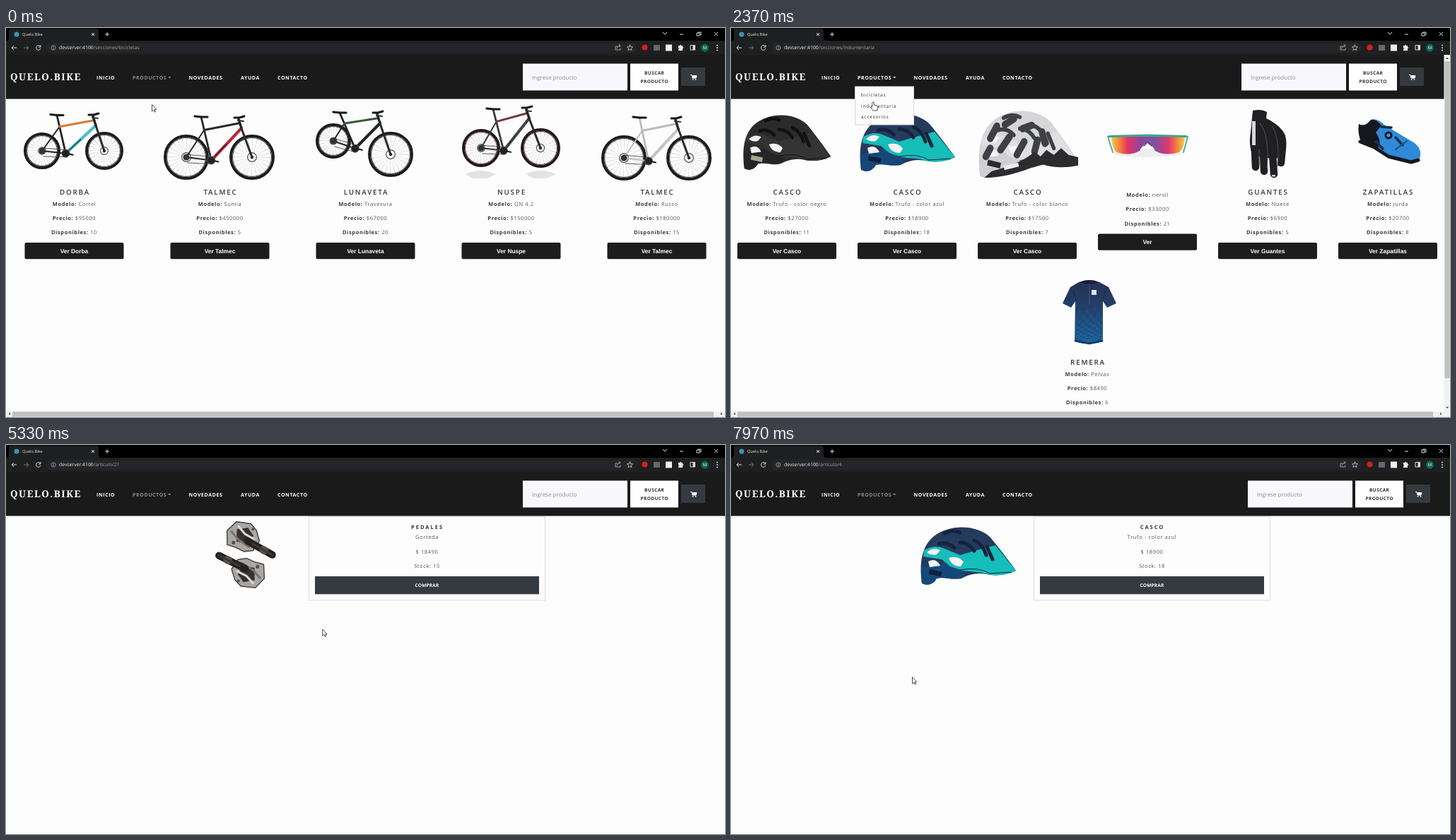
An HTML page for the animation above (8 s loop, 1017 px wide and 551 px high).

```html
<!DOCTYPE html>
<html lang="es">
<head>
<meta charset="utf-8">
<title>Tienda</title>
<style>
html, body { margin: 0; width: 100%; height: 100%; overflow: hidden; background: #fdfdfd }
svg { display: block }
text { font-family: "Open Sans", "Noto Sans", sans-serif; white-space: pre; text-rendering: geometricPrecision }
.mid { text-anchor: middle }
.b { font-weight: 700 }
.info { font-size: 7.5px; letter-spacing: .6px; fill: #555 }
.info tspan { font-weight: 700; fill: #3a3a3a }
.btn { font: 700 8.4px "Liberation Sans", Arial, sans-serif; fill: #fff }
.nav { font-size: 7px; font-weight: 700; letter-spacing: .6px }
.logo { font: 900 13.5px "Noto Serif", serif; letter-spacing: 1.5px }
</style>
</head>
<body>
<svg id="stage" width="1017" height="551" viewBox="0 0 1017 551"></svg>
<script>
const text = (x, y, s, attrs) => `<text x="${x}" y="${y}" ${attrs}>${s}</text>`;
const rect = (x, y, w, h, fill, attrs = '') => `<rect x="${x}" y="${y}" width="${w}" height="${h}" fill="${fill}" ${attrs}/>`;
const disc = (x, y, r, fill, attrs = '') => `<circle cx="${x}" cy="${y}" r="${r}" fill="${fill}" ${attrs}/>`;
const path = (d, fill, attrs = '') => `<path d="${d}" fill="${fill}" ${attrs}/>`;
const stroke = (d, color, w = 1) => path(d, 'none', `stroke="${color}" stroke-width="${w}" stroke-linecap="round" stroke-linejoin="round"`);
const line = (pts, color, w) => stroke('M' + pts.join('L'), color, w);
const group = (s, attrs) => `<g ${attrs}>${s}</g>`;
const mix = (a, b, k) => a.map((v, i) => v + (b[i] - v) * k);
const off = (p, x, y) => [p[0] + x, p[1] + y];

// Browser window and navigation bar
function chrome() {
  const bar = '#1e1f21';
  const thin = d => path(d, 'none', 'stroke="#ddd"');
  return rect(0, 0, 1017, 18, '#000') + rect(0, 18, 1017, 20, bar) +
    path('M1 18Q4 18 4 14V4Q4 1 7 1H128Q131 1 131 4V14Q131 18 135 18Z', bar) +
    disc(15, 9, 3.5, '#3f96ad') + text(23, 11, 'Quelo.Bike', 'font-size="5.7" fill="#e4e4d8"') +
    thin('M121 7l4 4m0-4l-4 4M140 9h6m-3-3v6') +
    thin('M929 6l3 3 3-3M953 9h5M977 7h4v4h-4zM979 7v-1h4v4h-1M1002 6l5 5m0-5l-5 5') +
    rect(57, 20.5, 835, 15, '#242528', 'rx="7.5"') +
    thin('M15 28H8l3-3m-3 3l3 3') + path('M25 28h7l-3-3m3 3l-3 3', 'none', 'stroke="#777"') +
    thin('M48.5 26A3.3 3.3 0 1 0 49 29M49 24v3h-3') +
    disc(67, 28, 3.1, 'none', 'stroke="#aaa" stroke-width=".8"') + rect(66.6, 27.4, .9, 2.5, '#bbb') + rect(66.6, 25.8, .9, .9, '#bbb') +
    '<text id="url" x="75" y="30.4" font-size="6.85" fill="#a0a3a7"><tspan fill="#eee">devserver:4100</tspan><tspan id="route"></tspan></text>' +
    stroke('M865 26h-3v5h7v-2M864 29q1-4 5-4m-2-2l2 2-2 2', '#bbb', .8) +
    stroke('M882.5 24l1.2 2.6 2.8.3-2.1 1.9.6 2.8-2.5-1.5-2.5 1.5.6-2.8-2.1-1.9 2.8-.3z', '#ddd', .8) +
    disc(903.5, 27.5, 4, '#d32020') + rect(916, 24, 9, 8, '#65686e') + rect(933, 23.5, 9, 9, '#f0f0f0') +
    path('M951 25h2q1-3 2 0h2v2q3 1 0 2v3h-6v-2q2-1 0-2z', '#eee') +
    thin('M968 24.5h6.5v6.5h-6.5z') + rect(971.5, 24, 3, 7, '#ddd') +
    disc(988.5, 28, 5.5, '#0b6a55') + text(988.5, 30.2, 'M', 'class="mid" font-size="6" fill="#fff"') +
    [24.5, 28, 31.5].map(y => disc(1006, y, 1, '#ddd')).join('');
}
function navbar() {
  const links = [[128, 'INICIO'], [258.5, 'NOVEDADES'], [332, 'AYUDA'], [384, 'CONTACTO']];
  return rect(0, 38, 1017, 62.5, '#1a1a1a') + text(6, 73.5, 'QUELO.BIKE', 'class="logo" fill="#fff"') +
    links.map(([x, s]) => text(x, 72.5, s, 'class="nav" fill="#fff"')).join('') +
    group(text(179, 72.5, 'PRODUCTOS', 'class="nav"') + '<path d="M229 69h4.5l-2.25 2.3z"/>', 'id="products"') +
    group(rect(731, 50.5, 148, 38, '#f7f7fc') + text(744, 72.7, 'Ingrese producto', 'font-size="8" fill="#8b8d93"') +
      rect(883, 50.5, 68, 38, '#fff') +
      ['BUSCAR', 'PRODUCTO'].map((s, i) => text(917.2, 65.5 + i * 12.7, s, 'class="mid b" font-size="6.5" letter-spacing=".4" fill="#2b2f33"')).join('') +
      rect(955, 56, 34, 26, '#343a40') + path('M968 66.5h2l1 4.5h5l1-3.5h-6', '#fff', 'stroke="#fff"') +
      disc(971.5, 72.8, .9, '#fff') + disc(975.5, 72.8, .9, '#fff'), 'id="search"');
}
function menu() {
  return group(rect(175, 82.5, 84, 55, '#fcfcfd') + rect(175.5, 83, 83, 54, 'none', 'stroke="#000" stroke-opacity=".15"') +
    ['bicicletas', 'indumentaria', 'accesorios'].map((s, i) => text(184, 97.4 + i * 15.4, s, 'font-size="6.5" letter-spacing=".75" fill="#333"')).join(''), 'id="menu"');
}
function scrollbars(right, vertical) {
  let s = rect(0, 543, 1017, 8, '#f1f1f1') + rect(9, 543.5, right - 25, 7, '#c1c1c1') +
    path(`M6 544.5v4l-2.5-2zM${right - 6} 544.5v4l2.5-2z`, '#505050');
  if (vertical) s += rect(1008.5, 38, 8.5, 505, '#f1f1f1') + rect(1009.5, 47, 7, 449, '#c1c1c1') +
    path('M1011 44h4l-2-2.5zM1011 536.5h4l-2 2.5z', '#505050');
  return s;
}

// Product cards
function card(x, name, model, price, stock, dy = 0) {
  const info = [['Modelo', model], ['Precio', '$' + price], ['Disponibles', stock]];
  const y = dy - (name ? 0 : 12.6);
  const label = 'Ver ' + name.slice(0, 1) + name.slice(1).toLowerCase();
  return text(x + 1, 236 + y, name, 'class="mid" font-size="9.8" font-weight="600" letter-spacing="1.8" fill="#33373b"') +
    info.map(([k, v], i) => text(x, 251.6 + y + i * 20.3, `<tspan>${k}:</tspan> ${v}`, 'class="mid info"')).join('') +
    rect(x - 70, 304 + y, 140, 23.3, '#1d1d1d', 'rx="2"') + text(x, 318.6 + y, label.trim(), 'class="mid btn"');
}
function detail(name, model, price, stock) {
  return rect(428.5, 101.5, 334, 118.5, '#fdfdfd', 'stroke="#dcdcd8"') +
    text(596, 118.5, name, 'class="mid b" font-size="7.5" letter-spacing="2" fill="#333"') +
    [model, '$ ' + price, 'Stock: ' + stock].map((s, i) => text(595.5, 133.3 + i * 20.3, s, 'class="mid info"')).join('') +
    rect(437, 186, 317, 25.3, '#343a40') + text(595.5, 201.2, 'COMPRAR', 'class="mid b" font-size="6.5" letter-spacing=".2" fill="#fff"');
}

// Pictures
function wheel([x, y], r, rim) {
  return disc(x, y, r / 2, 'none', `stroke="#999" stroke-width="${r}" stroke-dasharray=".25 ${Math.PI * r / 24 - .25}"`) +
    disc(x, y, r - 2, 'none', 'stroke="#1c1c1c" stroke-width="4"') +
    disc(x, y, r - 4.6, 'none', `stroke="${rim}" stroke-width="1"`) +
    disc(x, y, r * .2, 'none', 'stroke="#555" stroke-width="1.2"') + disc(x, y, 2.2, '#222');
}
function bike(rear, front, r1, r2, seat, bar, color, down, top = color, rim = '#444') {
  const crank = off(mix(rear, front, .38), 0, r1 * .14);
  const joint = mix(seat, crank, .3), head = off(bar, -1, 8), fork = off(bar, 3, 15);
  return wheel(rear, r1, rim) + wheel(front, r2, rim) +
    line([joint, rear, crank], color, 2) + line([seat, crank], color, 2.8) +
    line([joint, head], top, 3) + line([crank, fork], down, 4.2) + line([mix(crank, fork, .1), mix(crank, fork, .5)], color, 1.2) +
    line([off(bar, -1, 2), fork], '#222', 3.4) + line([fork, front], '#2b2b2b', 3) +
    line([off(bar, -7, 0), bar, off(bar, 7, -2)], '#181818', 3) + line([off(bar, -2, 4), off(bar, 6, 5)], '#333', 2) +
    line([off(seat, -9, -1), seat, off(seat, 9, 0)], '#181818', 3.2) +
    line([off(rear, 0, -4), off(crank, 0, -5)], '#333', .8) + line([off(rear, 2, 8), off(crank, 0, 5)], '#333', .8) +
    disc(...rear, 4.5, '#333') + disc(...crank, 5.5, '#222', 'stroke="#555"') +
    line([off(crank, -3, -1), off(crank, 10, 2)], '#222', 2.2);
}
function helmet(x, y, sx, sy, dome, back, visor, slot, badge, extra = '') {
  return group(
    path('M2 80C-2 50 2 28 18 14C40-4 78-4 98 14C108 26 124 46 135 62Q120 70 98 68C84 64 70 66 58 73C44 76 32 70 23 73Q18 82 8 82Z', dome) +
    path('M1 58L40 50L60 60L62 70C44 76 32 70 23 73Q18 82 8 82L2 80Z', back) +
    path('M5 33Q20 25 32 30L56 40L76 34L98 28L106 26L135 62Q120 70 98 68C84 63 72 64 60 62L42 56L30 46L4 42Z', visor) +
    path('M9 36Q18 28 28 33L23 39Q15 41 9 36ZM40 44Q54 40 61 50L57 56Q44 56 40 44ZM11 49Q22 43 28 55L13 57Z', '#f4f4f4') +
    stroke('M34 9Q46 3 56 8M56 22Q68 22 76 34M76 19Q88 24 93 40M26 24Q38 20 48 30M94 28L102 46', slot, 5) +
    stroke('M56 61Q82 56 98 66L128 64', slot, 1) +
    extra + rect(12, 62, 18, 7, badge, 'transform="rotate(12 22 66)"'),
    `transform="translate(${x} ${y}) scale(${sx} ${sy})"`);
}
const blueHelmet = (x, y) => helmet(x, y, 1, 1, '#243b5e', '#154878', '#16bdb9', '#15243c', '#0d2240');
const blackHelmet = () => helmet(17, 123, .92, .95, '#2b2b2c', '#252526', '#343435', '#111', '#a9a591');
function whiteHelmet() {
  const vents = stroke('M16 34L25 19M30 48L42 32M52 54L62 38M76 50L80 36M36 17L48 10M60 22L72 18M10 56L16 46M90 40L86 26', '#3f4046', 9);
  const peak = path('M18 74Q60 64 76 50L84 56L92 48L102 54L112 46L122 54L135 57V67Q108 72 88 66C66 70 44 82 8 82Z', '#2c2c2f');
  return helmet(350, 117, 1.045, 1.16, '#d6d6d9', '#d0d0d4', '#dfdfe2', '#3f4046', '#2c2c2f', vents + peak + rect(34, 66, 20, 5, '#eee', 'transform="rotate(-12 42 66)"'));
}
function glasses() {
  return '<ellipse cx="589" cy="177" rx="50" ry="6" fill="#eee"/>' +
    line([[540, 176], [533, 154], [590, 153], [646, 154], [640, 176]], '#55ad98', 2) +
    path('M538 154H642Q642 168 634 176Q614 182 600 174Q595 164 589 163Q583 164 578 174Q564 182 545 176Q538 168 538 154Z', 'url(#lens)') +
    line([[535, 153.5], [589, 152], [644, 153.5]], '#3da58f', 3) + line([[584, 167], [589, 162], [595, 167]], '#455', 1.5);
}
function glove() {
  return path('M738 117Q750 114 758 119L757 128Q778 138 784 152Q787 164 784 176L770 186L737 180Q732 162 735 148Z', '#202022') +
    stroke('M741 172L742 197M753 176L754 203M766 178L768 207M780 168L778 191', '#202022', 10.5) +
    stroke('M748 135Q762 152 758 198M766 140Q777 160 773 196M747 172V194', '#48484b', 1.2) +
    rect(737, 132, 5, 34, '#d8d8d8') + rect(765, 208, 5, 2.5, '#ccc');
}
function shoe() {
  return path('M888 136Q897 141 905 130Q914 127 924 137Q945 150 962 160Q977 168 975 182Q972 191 960 191Q930 186 912 171L892 163Q886 150 888 136Z', '#2f8ad8') +
    path('M888 136Q897 141 905 130Q912 128 920 138L912 148Q922 162 914 171L892 163Q886 150 888 136Z', '#15181f') +
    line([[890, 161], [910, 169], [930, 182], [962, 190], [972, 187]], '#15181f', 5) +
    stroke('M920 140L934 141M940 155L950 166M912 161L922 171', '#15304c', 3.5) + line([[940, 172], [956, 160]], '#1b5b94', 2.5) +
    disc(930, 152, 5.5, '#15181f') + disc(930, 152, 2.5, '#4b9fe0');
}
function jersey() {
  let specks = '';
  for (let i = 0; i < 160; i++) {
    const y = 392 + 50 * Math.sqrt(i * .618 % 1);
    specks += rect((488 + i * 7.3 % 37).toFixed(1), y.toFixed(1), 1, 1, i % 2 ? '#1b3459' : '#2678b3');
  }
  return path('M492 360Q507 354 521 360L534 367L545 390L532 396L526 387L526 444Q507 451 486 444L487 387L481 396L469 390L480 367Z', 'url(#cloth)') + specks +
    path('M494 360Q507 354 519 360Q507 366 494 360Z', '#17213b') + stroke('M488 386L484 372M526 386L529 372', '#1b294a') +
    line([[507, 363], [507, 390]], '#5a6f96', .7) + rect(510, 371, 7, 7, '#dfe6ee') + line([[487, 443], [507, 447], [525, 443]], '#12395e', 2.5);
}
function pedals() {
  const body = (x, y, turn) => group(
    path('M-23-6L-12-20L8-20L17-12L23 2L16 16L4 19L-8 15L-20 13Z', '#aaa6a3', 'stroke="#4b4948" stroke-width="1.5"') +
    path('M-10-10L5-14L14-4L8 8L-8 7Z', '#35322f') +
    line([[-17, -6], [-6, 4], [10, 12]], '#777370', 3) + line([[-8, -14], [2, -5], [15, 0]], '#ddd9d5', 3) +
    disc(-12, 9, 2.5, '#55514e') + disc(12, -13, 2, '#55514e'), `transform="translate(${x} ${y}) rotate(${turn})"`);
  const axle = (a, b) => line([a, b], '#24221f', 10) + line([mix(a, b, .65), mix(a, b, .68)], '#55524e', 11) + line([mix(a, b, .2), b], '#3d3935', 3);
  return body(509, 136, 8) + axle([515, 141], [549, 160]) + body(516, 184, 186) + axle([512, 179], [476, 161]);
}

const pages = {
  bikes: bike([51, 174], [139, 174], 26, 27, [72, 123.5], [124, 123], '#222', '#49bfc6', '#d97b35') +
    bike([255, 183], [348, 183], 32, 32, [276, 126], [330, 127], '#26282b', '#bb2635') +
    bike([463, 160], [544, 179], 25, 32, [472, 120], [526, 120], '#202322', '#232625', '#38583a') +
    path('M650 207Q672 197 693 207L680 213H660ZM735 207Q757 197 778 207L765 213H746Z', '#e2e2e2') +
    bike([672, 170], [756, 170], 27, 28, [689, 115], [737, 113], '#37373b', '#424248', '#6d3a40', '#7b3032') +
    bike([874, 184], [966, 184], 32, 32, [896, 127], [948, 128], '#b9bbbd', '#c5c7c9') +
    card(96.5, 'DORBA', 'Cortel', 95000, 10) + card(302.5, 'TALMEC', 'Sumia', 450000, 5) + card(508.5, 'LUNAVETA', 'Travesura', 67000, 20) +
    card(714.5, 'NUSPE', 'QN 4.2', 150000, 5) + card(920.5, 'TALMEC', 'Ruzco', 180000, 15) + scrollbars(1017),
  wear: blackHelmet() + blueHelmet(182, 121) + whiteHelmet() + glasses() + glove() + shoe() + jersey() +
    card(79, 'CASCO', 'Trufo - color negro', 27000, 11) + card(249, 'CASCO', 'Trufo - color azul', 18900, 18) +
    card(419, 'CASCO', 'Trufo - color blanco', 17500, 7) + card(589, '', 'nervil', 33000, 21) +
    card(759, 'GUANTES', 'Nueve', 6900, 5) + card(929, 'ZAPATILLAS', 'Jurda', 20700, 8) +
    card(504, 'REMERA', 'Pelvax', 8490, 6, 241) + scrollbars(1009, true),
  extras: pedals() + card(508.5, 'PEDALES', 'Gorteda', 18490, 15) + scrollbars(1017),
  pedal: group(pedals(), 'transform="translate(-190 -9.5) scale(1.032)"') + detail('PEDALES', 'Gorteda', 18490, 15),
  helmet: blueHelmet(268, 116) + detail('CASCO', 'Trufo - color azul', 18900, 18)
};

const stage = document.getElementById('stage');
stage.innerHTML = `<defs>
  <linearGradient id="lens"><stop offset="0" stop-color="#f2cf4a"/><stop offset=".1" stop-color="#f08a3c"/><stop offset=".22" stop-color="#e5335f"/><stop offset=".4" stop-color="#8d479c"/><stop offset=".6" stop-color="#80509f"/><stop offset=".78" stop-color="#e0386c"/><stop offset=".9" stop-color="#f08a3c"/><stop offset="1" stop-color="#f2cf4a"/></linearGradient>
  <linearGradient id="cloth" x2="0" y2="1"><stop offset="0" stop-color="#243152"/><stop offset=".45" stop-color="#23406c"/><stop offset="1" stop-color="#1a659c"/></linearGradient>
  </defs>` + rect(0, 0, 1017, 551, '#fdfdfd') + chrome() + navbar() +
  Object.entries(pages).map(([id, s]) => group(s, `id="${id}"`)).join('') + menu() +
  group(path('M0 0V9.5L2.2 7.5L3.7 10.5L5 9.9L3.6 7H6.3Z', '#fff', 'stroke="#222" stroke-width=".8"'), 'id="arrow"') +
  group(path('M1 0Q2.5-1 2.5 1V4L7 5Q8.5 5.5 8 8L7 12H1.5L-2 7.5Q-2 6 0 7V1Z', '#fff', 'stroke="#222" stroke-width=".8"'), 'id="hand"');

// Time, page, route, menu open
const states = [
  [0, 'bikes', '/secciones/bicicletas', 0], [800, 'bikes', '/secciones/bicicletas', 1],
  [1300, 'bikes', '/secciones/indumentaria', 0], [1850, 'wear', '/secciones/indumentaria', 0],
  [2070, 'wear', '/secciones/indumentaria', 1], [2670, 'wear', '/secciones/accesorios', 0],
  [2930, 'extras', '/secciones/accesorios', 0], [4430, 'pedal', '/articulo/21', 0],
  [6030, 'pedal', '/articulo/21', 1], [6470, 'pedal', '/secciones/indumentaria', 0],
  [6630, 'wear', '/secciones/indumentaria', 0], [7530, 'helmet', '/articulo/4', 0]
];
// Time, x, y of the pointer
const track = [
  [0, 206.5, 108.5], [30, 206.5, 108.5], [270, 202, 103], [430, 202, 103], [470, 197.5, 100.5], [640, 197.5, 100.5],
  [780, 200, 71], [920, 200, 71], [1180, 201, 106], [1300, 201, 106], [1470, 202, 111], [1850, 202, 111],
  [2020, 204, 72], [2120, 204, 72], [2330, 200, 105], [2390, 199.5, 105], [2540, 190, 121], [2700, 190, 121],
  [3130, 187.5, 115], [3300, 193, 101.5], [3500, 193, 101.5], [4170, 452, 315], [4450, 452, 315],
  [5130, 449, 262], [5170, 447.8, 261], [5330, 447.8, 261], [5980, 204, 71], [6100, 204, 71], [6350, 200, 106],
  [6480, 200, 106], [7070, 247.5, 165], [7400, 250, 316], [7570, 250, 316], [7800, 250.5, 335], [7900, 257, 325],
  [7970, 256.5, 328.7], [8000, 256.5, 328.7]
];
const $ = id => document.getElementById(id);
const show = (id, on) => $(id).setAttribute('visibility', on ? 'visible' : 'hidden');
function pointer(t) {
  const i = track.findIndex(k => k[0] > t), a = track[i - 1], b = track[i];
  const k = (t - a[0]) / (b[0] - a[0]);
  return mix(a, b, k * k * (3 - 2 * k)).slice(1);
}
function draw(t) {
  const [, page, route, open] = states.filter(s => s[0] <= t).pop();
  const [x, y] = pointer(t);
  for (const id in pages) show(id, id === page);
  show('menu', open);
  $('route').textContent = route;
  $('products').setAttribute('fill', open ? '#fff' : '#8c8c8c');
  $('search').setAttribute('transform', `translate(${page === 'wear' ? -9 : 0})`);
  const onButton = y > 304 && y < 327 && (page === 'extras' ? x > 438 : page === 'wear' && x > 179);
  const hand = y < 79 || open && y > 88 && y < 135 && x < 259 || onButton;
  show('arrow', !hand);
  show('hand', hand);
  $(hand ? 'hand' : 'arrow').setAttribute('transform', `translate(${x} ${y})`);
}
function tick() {
  draw(performance.now() % 8000);
  requestAnimationFrame(tick);
}
tick();
</script>
</body>
</html>
```
